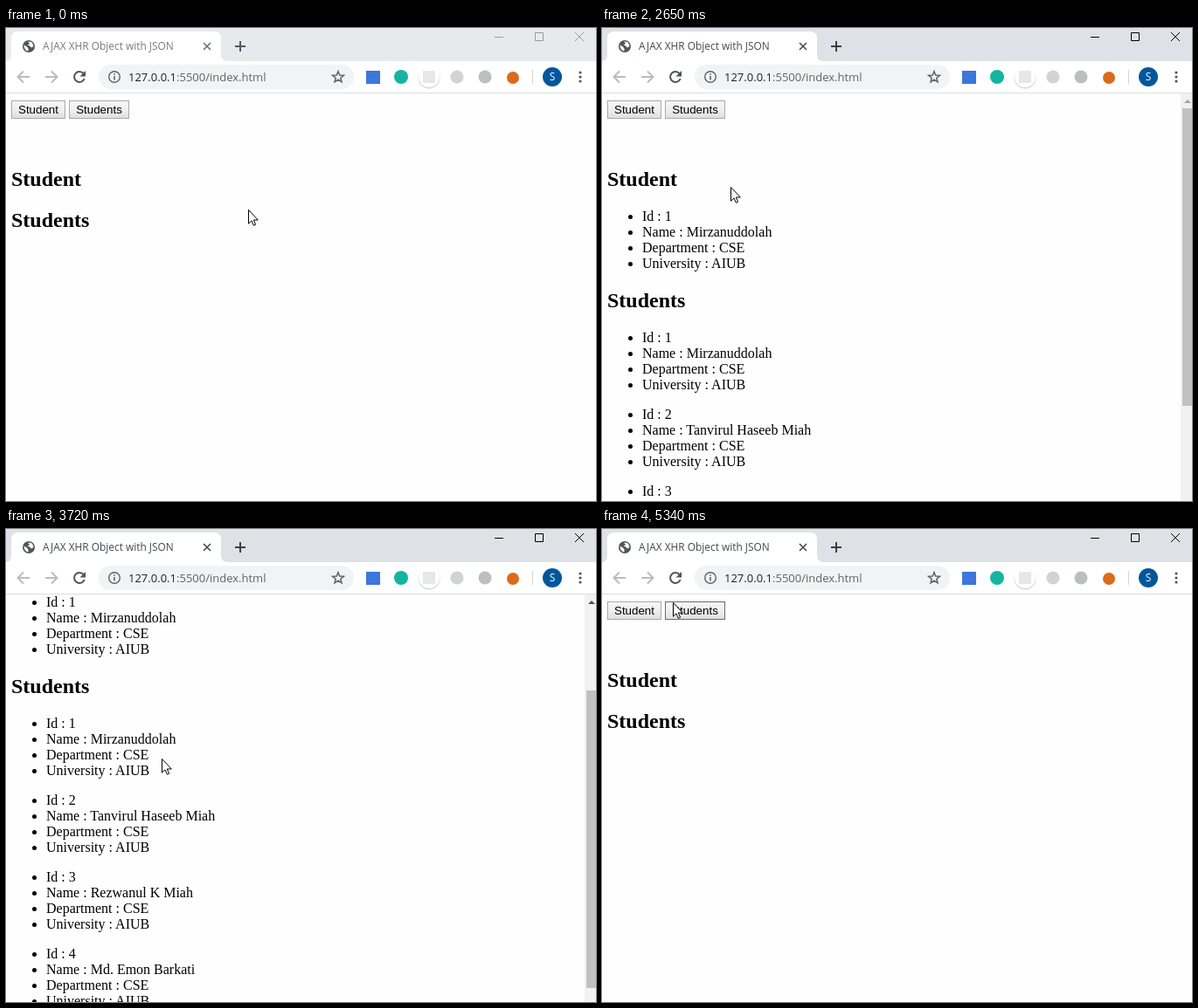
An HTML page that plays this animation: 675x542 px, repeating every 5410 ms.

```html
<!DOCTYPE html>
<html lang="en">
<head>
<meta charset="utf-8">
<title>AJAX XHR Object with JSON</title>
<style>
  html, body { margin: 0; width: 100%; height: 100%; overflow: hidden; background: #fefefe; }
  #stage { position: relative; width: 675px; height: 542px; overflow: hidden; }
  #stage > svg { position: absolute; left: 0; top: 0; }
  #view { position: absolute; left: 0; top: 75px; width: 675px; height: 467px; overflow: hidden; }
  #page { position: absolute; left: 6px; top: 0; width: 656px; color: #000;
          font: 16px/18px "Liberation Serif", "Times New Roman", serif; }
  h2 { margin: 20px 0; height: 27px; font-size: 24px; line-height: 27px; }
  #page h2:first-of-type { margin-top: 85px; }
  ul { margin: 16px 0; padding-left: 40px; }
  li { height: 18px; white-space: nowrap; }
  button { position: absolute; top: 8px; height: 21px; padding: 0; box-sizing: border-box;
           border: 1px solid #a9a9a9; border-radius: 0; color: #000;
           background: linear-gradient(#f6f6f6, #efefef 50%, #dfdfdf);
           font: 13.333px/18px "Liberation Sans", Arial, sans-serif; }
  button.hover { border-color: #6b6b6b; }
  #one { left: 0; width: 62px; }
  #many { left: 66px; width: 69px; }
  #bar { position: absolute; left: 662px; top: 0; width: 17px; height: 480px; background: #f1f1f1; }
  #thumb { position: absolute; left: 2px; top: 17px; width: 13px; height: 341px; background: #c1c1c1; }
  #up { position: absolute; left: 4px; top: 7px; border: solid transparent; border-width: 0 4px 4px; }
  .ui { font-family: "Open Sans", sans-serif; }
</style>
</head>
<body>
<div id="stage">
  <svg width="675" height="76" viewBox="0 0 675 76" fill="none">
    <rect id="strip" width="675" height="38"/>
    <path fill="#fff" d="M0 38Q6 38 6 30V12Q6 4 14 4H238Q246 4 246 12V30Q246 38 254 38H675V74H0Z"/>
    <path stroke="#dcdee1" d="M0 74.5H675"/>
    <g id="globe">
      <circle cx="26" cy="21" r="7" fill="#50555a"/>
      <path fill="#fff" d="M20.6 19.5L24 21.5L25.5 23.5V26.4Q20.5 25.5 20.6 19.5ZM25 15.5L29 16Q31.5 18 31.5 21L29 22.5L26.5 20H24.5L27 18Z"/>
    </g>
    <path id="spinner" stroke="#8a8e93" stroke-width="2" d="M26 14.5A6.5 6.5 0 0 0 26 27.5"/>
    <text id="title" class="ui" x="42" y="25" font-size="11.9">AJAX XHR Object with JSON</text>
    <path id="tabClose" stroke-width="1.6" d="M226 17L234 25M234 17L226 25"/>
    <path id="plus" stroke-width="2" d="M262 21H274M268 15V27"/>
    <path id="controls" d="M559 10.5H569M605.5 5.5H614.5V14.5H605.5ZM651 5L661 15M661 5L651 15"/>

    <circle id="halo" cx="84" cy="56" r="14" fill="#f1f3f4"/>
    <g stroke="#babcbe" stroke-width="2">
      <path d="M27 56H14M20 49.5L13.5 56L20 62.5"/>
      <path d="M45 56H58M52 49.5L58.5 56L52 62.5"/>
    </g>
    <path stroke="#50555a" stroke-width="2" d="M88.7 52.2A6 6 0 1 0 89.7 58"/>
    <path fill="#50555a" d="M91 49V55.5H84.5Z"/>
    <rect x="106" y="42" width="292" height="28" rx="14" fill="#f1f3f4"/>
    <circle cx="124" cy="56" r="6.3" stroke="#5f6368" stroke-width="1.4"/>
    <path stroke="#5f6368" stroke-width="1.6" d="M124 55V59.5M124 52.2V53.8"/>
    <text class="ui" x="140" y="61" font-size="13" fill="#202124">127.0.0.1<tspan fill="#5f6368">:5500/index.html</tspan></text>
    <path stroke="#5f6368" stroke-width="1.5" d="M380 49.7L381.7 54.1L386.4 54.3L382.8 57.2L384 61.8L380 59.2L376 61.8L377.2 57.2L373.6 54.3L378.3 54.1Z"/>

    <rect x="412" y="49" width="16" height="15" fill="#3d76dc"/>
    <circle cx="452" cy="56" r="8" fill="#14b5a0"/>
    <circle cx="484" cy="57" r="12.5" fill="#d5d7d9"/>
    <circle cx="484" cy="56" r="12" fill="#fff"/>
    <rect x="477" y="49" width="14" height="14" fill="#e6e7e8"/>
    <circle cx="516" cy="56" r="7.5" fill="#d2d3d5"/>
    <circle cx="548" cy="56" r="7.5" fill="#bcbec1"/>
    <circle cx="580" cy="57" r="7" fill="#dc6a1c"/>
    <path stroke="#d3d5d8" d="M602.5 48V64"/>
    <circle cx="625" cy="56" r="11" fill="#01579b"/>
    <text class="ui" x="625" y="60.3" font-size="12" text-anchor="middle" fill="#fff">S</text>
    <g fill="#50555a">
      <circle cx="657" cy="51" r="1.6"/><circle cx="657" cy="56" r="1.6"/><circle cx="657" cy="61" r="1.6"/>
    </g>
  </svg>

  <div id="view">
    <div id="page">
      <button id="one">Student</button><button id="many">Students</button>
      <h2>Student</h2>
      <div id="single"></div>
      <h2>Students</h2>
      <div id="group"></div>
    </div>
    <div id="bar"><div id="up"></div><div id="thumb"></div></div>
  </div>

  <svg width="675" height="542" fill="none">
    <g id="cursor">
      <path id="arrow" fill="#fff" stroke="#000" d="M.5 .5V16.2L4 12.9L6.4 18.3L8.6 17.3L6.3 12H11.3Z"/>
      <path id="beam" stroke="#222" d="M-3.5 -7.5H-1L.5 -6.5L2 -7.5H4.5M.5 -7V7M-3.5 7.5H-1L.5 6.5L2 7.5H4.5"/>
    </g>
  </svg>
</div>

<script>
const LOOP = 5410;
const $ = id => document.getElementById(id);

const names = ["Mirzanuddolah", "Tanvirul Haseeb Miah", "Rezwanul K Miah", "Md. Emon Barkati"];
const record = (name, i) =>
  `<ul><li>Id : ${i + 1}<li>Name : ${name}<li>Department : CSE<li>University : AIUB</ul>`;
$("single").innerHTML = record(names[0], 0);
$("group").innerHTML = names.map(record).join("");

// Bursts of screen updates: first time, last time, count
const bursts = [
  [80, 620, 8], [690, 690, 1], [1010, 1550, 8], [1620, 1790, 3], [2250, 2330, 2],
  [2650, 3180, 8], [3260, 3800, 8], [3870, 4410, 8], [4490, 4490, 1], [4720, 5260, 8], [5340, 5340, 1]
];
const ticks = [0, ...bursts.flatMap(([from, to, n]) => Array.from({ length: n }, (_, i) =>
  Math.round((from + (to - from) * i / Math.max(1, n - 1)) / 10) * 10))];

// Time, x, y
const pointer = [
  [0, 277, 208], [150, 255, 196], [310, 155, 148], [460, 72, 102], [620, 43, 87], [690, 42, 86],
  [1170, 42, 86], [1320, 65, 90], [1480, 100, 95], [1550, 105, 95], [1790, 111, 90], [2330, 111, 90],
  [2650, 147, 182], [3030, 157, 230], [3260, 160, 234], [3640, 175, 259], [3720, 178, 263],
  [3950, 178, 255], [4100, 158, 195], [4260, 115, 95], [4410, 91, 50], [4490, 89, 47],
  [4870, 89, 47], [5100, 86, 60], [5260, 82, 79], [5340, 81, 84]
];
// Time, offset
const scrolling = [
  [0, 0], [2650, 0], [2730, 30], [2800, 82], [2880, 126], [2960, 145],
  [3640, 145], [3720, 132], [3800, 70], [3870, 22], [3950, 0]
];

function sample(track, t) {
  const i = track.findIndex(key => key[0] > t);
  if (i < 0) return track[track.length - 1].slice(1);
  const a = track[i - 1], b = track[i], k = (t - a[0]) / (b[0] - a[0]);
  return a.slice(1).map((v, j) => Math.round(v + (b[j + 1] - v) * k));
}

const show = (id, on) => { $(id).style.display = on ? "" : "none"; };
const paint = (id, attr, color) => $(id).setAttribute(attr, color);

function render(time) {
  const t = ticks.filter(tick => tick <= time).pop();
  const [x, y] = sample(pointer, t);
  const [scroll] = sample(scrolling, t);
  const between = (from, to) => t >= from && t < to;
  const active = t >= 1010, beam = between(2960, 3260), loading = between(4720, 4870);

  paint("strip", "fill", active ? "#dee1e6" : "#e7eaed");
  paint("title", "fill", active ? "#45494d" : "#777b80");
  paint("tabClose", "stroke", active ? "#45494d" : "#6c7075");
  paint("plus", "stroke", active ? "#3c4043" : "#55595d");
  paint("controls", "stroke", active ? "#000" : "#999");
  show("globe", !loading);
  show("spinner", loading);
  show("halo", Math.hypot(x - 84, y - 56) < 14);

  show("single", between(1090, 4720));
  show("group", between(2250, 4720));
  show("bar", between(2250, 4720));
  $("page").style.top = -scroll + "px";
  $("thumb").style.top = 17 + Math.round(scroll * 0.703) + "px";
  $("up").style.borderBottomColor = scroll ? "#505050" : "#a3a3a3";

  const over = (left, right) => !scroll && x >= left && x < right && y >= 83 && y < 104;
  $("one").className = over(6, 68) ? "hover" : "";
  $("many").className = over(72, 141) ? "hover" : "";

  $("cursor").setAttribute("transform", `translate(${x} ${y})`);
  show("arrow", !beam);
  show("beam", beam);
}

const start = performance.now();
function loop() {
  render((performance.now() - start) % LOOP);
  requestAnimationFrame(loop);
}
loop();
</script>
</body>
</html>
```
